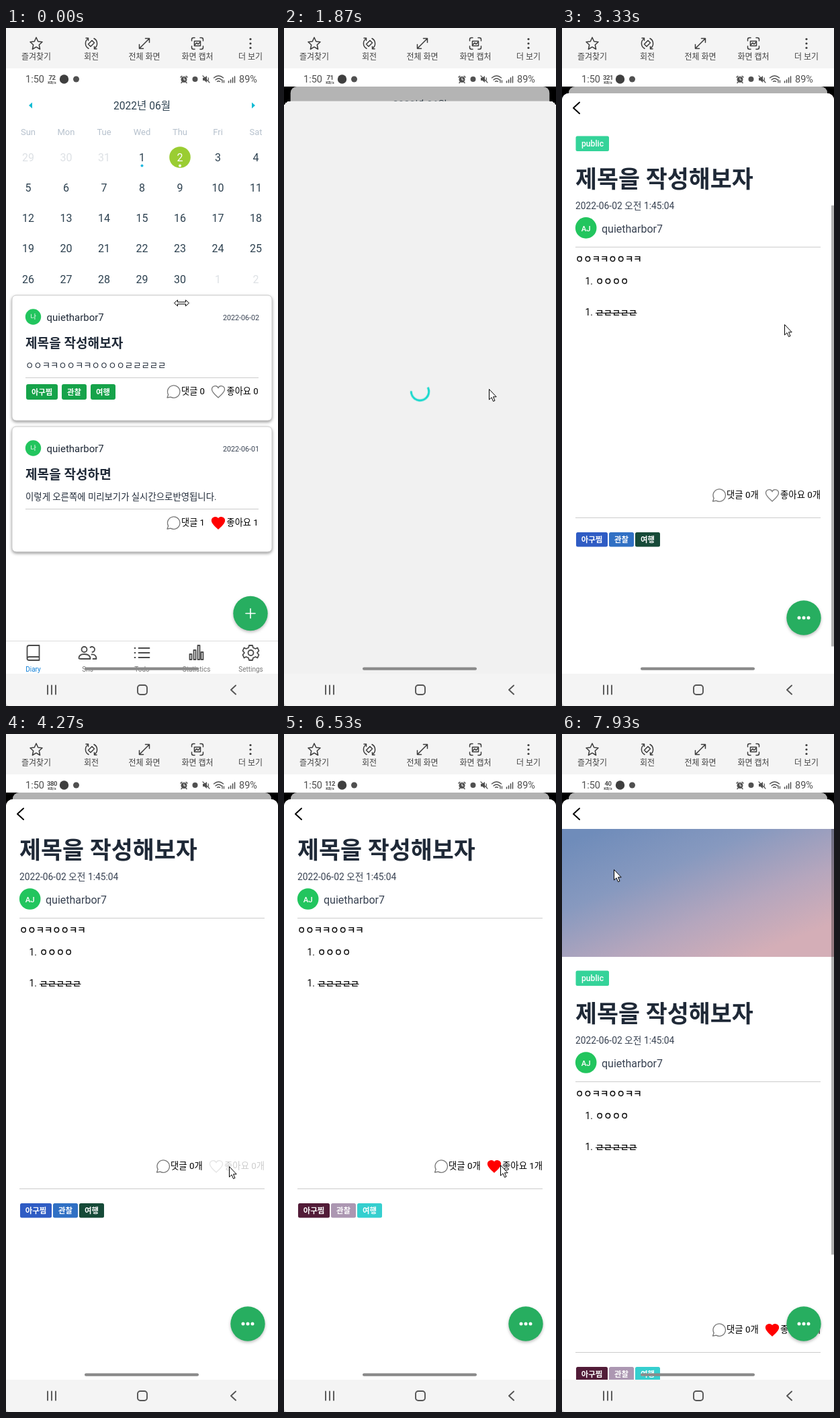
Recreate the animation shown at these times as an HTML page. Size 405 by 1007 pixels, loop 8 s.

```html
<!DOCTYPE html>
<html lang="ko">
<head>
<meta charset="utf-8">
<title>Diary</title>
<style>
@property --in { syntax: '<number>'; inherits: true; initial-value: 1; }
@property --scroll { syntax: '<number>'; inherits: true; initial-value: 0; }

html, body { margin: 0; width: 100%; height: 100%; overflow: hidden; background: #fff; }
#stage {
  position: relative; width: 405px; height: 1007px; overflow: hidden; background: #000;
  animation: enter 8s linear infinite, scroll 8s linear infinite;
}
svg { position: absolute; left: 0; top: 0; width: 405px; height: 1007px; }
text { font-family: Roboto, 'Noto Sans CJK KR', 'Noto Sans CJK', sans-serif; white-space: pre; }
.line { fill: none; stroke-linecap: round; stroke-linejoin: round; }
.medium { stroke: #000; stroke-width: .35px; }

#home, #sheet { position: absolute; left: 0; width: 405px; overflow: hidden; background: #fff; }
#home {
  top: 87px; height: 872px; transform-origin: 50% 0;
  transform: scale(calc(.951 + .049 * var(--in)));
  border-radius: calc((1 - var(--in)) * 10px);
}
#home svg { top: -87px; }
#dim { position: absolute; inset: 0; background: #000; opacity: calc(.3 * (1 - var(--in))); }
#sheet {
  top: 97px; height: 862px; border-radius: 10px 10px 0 0;
  transform: translateY(calc(var(--in) * 862px));
}
#sheet svg { top: -97px; }
#content { transform: translateY(calc(var(--scroll) * -1px)); }
#thumb { transform: translateY(calc(var(--scroll) * .76px)); }

.anim { animation: 8s linear infinite; }
.step { animation: 8s step-end infinite; }
#card { animation-name: card; }
#loading { animation-name: loading; }
#photo { animation-name: photo; }
#reactions { animation-name: reactions; }
#like { animation-name: like; }
#off { animation-name: unliked; }
#on { animation-name: liked; }
#author { animation-name: author; }
#bar { animation-name: bar; }
#speed { animation-name: speed; }
#glow { animation-name: glow; }
#arrow { animation-name: arrow; }
#resize { animation-name: resize; }
#point { animation-name: point; }
.tag { animation-name: tint; }
#spin { animation: spin 1.6s linear infinite, dash 1.6s linear infinite; }

@keyframes enter {
  0%, 15.5% { --in: 1; } 16.75% { --in: .507; } 18% { --in: .257; } 19.25% { --in: .13; }
  20.5% { --in: .066; } 21.75% { --in: .034; } 23.375% { --in: .0138; } 25.8%, to { --in: 0; }
}
@keyframes scroll {
  0%, 37.9% { --scroll: 0; animation-timing-function: cubic-bezier(.2, .6, .35, 1); }
  47% { --scroll: 271; }
  95.2% { --scroll: 271; animation-timing-function: cubic-bezier(.3, .5, .5, 1); }
  99.1%, to { --scroll: 28; }
}
@keyframes card { 0%, 10.4% { opacity: 1; } 10.9%, 11.7% { opacity: .2; } 14.1%, to { opacity: 1; } }
@keyframes loading { 0% { opacity: 1; } 25%, to { opacity: 0; } }
@keyframes photo { 0%, 27.5% { opacity: 0; } 31.25%, to { opacity: 1; } }
@keyframes reactions { 0% { opacity: 0; } 27.5%, to { opacity: 1; } }
@keyframes like {
  0%, 53.2% { opacity: 1; } 53.3%, 55% { opacity: .2; } 57.5%, 60.8% { opacity: 1; }
  61%, 62.6% { opacity: .2; } 65.4%, 70.8% { opacity: 1; }
  71%, 72.6% { opacity: .2; } 75.8%, to { opacity: 1; }
}
@keyframes liked { 0% { opacity: 0; } 57.5% { opacity: 1; } 65.6% { opacity: 0; } 76.25%, to { opacity: 1; } }
@keyframes unliked { 0% { opacity: 1; } 57.5% { opacity: 0; } 65.6% { opacity: 1; } 76.25%, to { opacity: 0; } }
@keyframes tint { 0% { fill: var(--a); } 57.5% { fill: var(--b); } 65.6% { fill: var(--c); } 76.25%, to { fill: var(--d); } }
@keyframes author { 0%, 92.5% { opacity: 1; } 93.4%, 95% { opacity: .2; } 97.8%, to { opacity: 1; } }
@keyframes bar { 0%, 38.3% { opacity: 0; } 38.6%, 48.4% { opacity: 1; } 51.6%, 95.2% { opacity: 0; } 95.5%, to { opacity: 1; } }
@keyframes speed {
  0% { transform: none; } 5% { transform: translateY(-20px); } 31.25% { transform: translateY(-40px); }
  42.5% { transform: translateY(-60px); } 56.25% { transform: translateY(-80px); }
  72.5% { transform: translateY(-100px); } 86.25% { transform: translateY(-120px); }
  97.5%, to { transform: translateY(-140px); }
}
@keyframes glow {
  0%, 36% { opacity: 0; transform: translate(335px, 722px); } 36.5% { opacity: 1; transform: translate(335px, 722px); }
  37.5% { opacity: 1; transform: translate(334px, 710px); } 40.4% { opacity: 1; transform: translate(332px, 480px); }
  41.3% { opacity: 0; transform: translate(331px, 440px); }
  92.4% { opacity: 0; transform: translate(113px, 250px); } 92.8% { opacity: 1; transform: translate(115px, 275px); }
  94.125% { opacity: 1; transform: translate(123px, 395px); } 95.6% { opacity: 1; transform: translate(120px, 510px); }
  96.3%, to { opacity: 0; transform: translate(119px, 520px); }
}
@keyframes arrow {
  0%, .875% { transform: translate(262px, 412px); animation-timing-function: ease-in-out; }
  9.1%, 26.6% { transform: translate(305px, 536px); animation-timing-function: ease-in-out; }
  33%, 36% { transform: translate(334px, 722px); } 37.5% { transform: translate(334px, 687px); }
  40% { transform: translate(332px, 470px); }
  41.3%, 47% { transform: translate(331px, 440px); animation-timing-function: ease-in-out; }
  51.6%, 59% { transform: translate(332px, 642px); } 61%, 70% { transform: translate(340px, 643px); }
  77%, 81.6% { transform: translate(322px, 640px); animation-timing-function: ease-in-out; }
  91.6% { transform: translate(112px, 236px); } 92.5% { transform: translate(115px, 265px); }
  94.125% { transform: translate(124px, 413px); } 95.6% { transform: translate(120px, 520px); }
  99.1%, to { transform: translate(77px, 201px); }
}
@keyframes resize { 0% { opacity: 1; } .875%, to { opacity: 0; } }
@keyframes point { 0% { opacity: 0; } .875%, to { opacity: 1; } }
@keyframes spin { to { transform: rotate(360deg); } }
@keyframes dash { 0%, to { stroke-dasharray: 170 190; } 50% { stroke-dasharray: 290 70; } }
</style>
</head>
<body>
<div id="stage">
  <div id="home"><svg id="homeArt"></svg><div id="dim"></div></div>
  <div id="sheet"><svg id="sheetArt"></svg></div>
  <svg id="chrome"></svg>
</div>
<script>
const INK = '#1f2937', GREEN = '#27ae60', USER = 'quietharbor7';
const BOLD = 'font-weight="700"', MEDIUM = 'class="medium"';

// y is the middle of the line; baselines sit on whole pixels
const text = (x, y, str, size, fill, attrs = '') =>
  `<text x="${x}" y="${Math.round(y + size * .355)}" font-size="${size}" fill="${fill}" ${attrs}>${str}</text>`;
const middle = (x, y, str, size, fill, attrs = '') => text(x, y, str, size, fill, 'text-anchor="middle" ' + attrs);
const line = (d, color, width = 1.5, attrs = '') =>
  `<path class="line" d="${d}" stroke="${color}" stroke-width="${width}" ${attrs}/>`;
const rect = (x, y, w, h, fill, r = 0, attrs = '') =>
  `<rect x="${x}" y="${y}" width="${w}" height="${h}" rx="${r}" fill="${fill}" ${attrs}/>`;
const dot = (x, y, r, fill, attrs = '') => `<circle cx="${x}" cy="${y}" r="${r}" fill="${fill}" ${attrs}/>`;
const at = (x, y, body) => `<g transform="translate(${x} ${y})">${body}</g>`;

const bubble = (x, y) => at(x, y, line('M-9.5 9L-7.8 4.6A9.2 9.2 0 1 1-4.3 8.1Z', '#777', 1.3));
const heart = (x, y, on) => at(x, y,
  `<path d="M0 9C-4 5.5-9.5 1-9.5-3.2A5 5 0 0 1 0-5.5A5 5 0 0 1 9.5-3.2C9.5 1 4 5.5 0 9Z"
    fill="${on ? '#f00' : 'none'}" stroke="${on ? '#f00' : '#777'}" stroke-width="1.3"/>`);
const fab = (x, y, icon) => at(x, y, dot(0, 0, 25.7, GREEN, 'filter="drop-shadow(0 2px 2px #0004)"') + icon);

function calendar() {
  const col = c => 33 + 56.5 * c;
  let out = middle(202.5, 115, '2022년 06월', 15.6, '#2d4150')
    + '<path d="M34 115L39 110.5V119.5Z M371 115L366 110.5V119.5Z" fill="#10bcd4"/>'
    + ['Sun', 'Mon', 'Tue', 'Wed', 'Thu', 'Fri', 'Sat'].map((d, i) => middle(col(i), 154.5, d, 13, '#b6c1cd')).join('')
    + dot(259, 192, 15.8, '#9acd32') + dot(259, 204.5, 2, '#fff') + dot(202.5, 204.5, 2, '#20b9e0');
  for (let i = 0; i < 35; i++) {
    const n = i - 2, outside = n < 1 || n > 30;
    const label = n < 1 ? n + 31 : n > 30 ? n - 30 : n;
    out += middle(col(i % 7), 192 + 45.25 * Math.floor(i / 7), label, 16,
      n === 2 ? '#fff' : outside ? '#dde1e5' : '#2d4150');
  }
  return out;
}

function card(y, { id = '', date, title, body, tags = [], count, on }) {
  const chips = tags.map(([x, w, s]) =>
    rect(x, y + 132, w, 23, '#16a34a', 3) + middle(x + w / 2, y + 143.5, s, 11.3, '#fff', BOLD)).join('');
  return rect(9, y, 387, 186, '#fff', 6, 'stroke="#ccc" filter="drop-shadow(0 2px 2px #0006)"')
    + `<g ${id && `id="${id}" class="anim"`}>`
    + dot(40.5, y + 32, 11.7, '#22c55e') + middle(40.5, y + 32, '나', 9.5, '#fff')
    + text(60.5, y + 33, USER, 15, INK) + text(377, y + 33, date, 10.7, '#374151', 'text-anchor="end"')
    + text(29, y + 71.5, title, 19.1, INK, BOLD) + text(29, y + 104, body, 13.4, INK)
    + rect(29, y + 122, 347, 1, '#ccc') + chips
    + bubble(249.5, y + 143) + text(261, y + 142, '댓글 ' + count, 13.2, '#000')
    + heart(316, y + 143, on) + text(328.5, y + 142, '좋아요 ' + count, 13.2, '#000') + '</g>';
}

function tabs() {
  const icons = [
    'M-9 9V-8Q-9-11-6-11H9V6H-6Q-9 6-9 8.5Q-9 11-6 11H9V6',
    'M-10 9Q-13 9-13 8Q-13 2-5 2Q4 2 4 9ZM-5-1A4 4 0 1 0-5-9A4 4 0 0 0-5-1M7-1A4 4 0 1 0 4-8M6 2.5Q13 2 13 9H8',
    'M-11-7H-10M-11 0H-10M-11 7H-10M-5-7H11M-5 0H11M-5 7H11',
    'M-10 10V2H-7V10ZM-4 10V-4H-1V10ZM2 10V-11H5V10ZM7 10V-1H10V10Z',
    'M-2.5-11H2.5L3.5-7.5L7-6L10-7.5L12-3L9.5 0L12 3L10 7.5L7 6L3.5 7.5L2.5 11H-2.5L-3.5 7.5L-7 6L-10 7.5L-12 3L-9.5 0L-12-3L-10-7.5L-7-6L-3.5-7.5ZM4 0A4 4 0 1 0-4 0A4 4 0 0 0 4 0'
  ];
  return rect(0, 910, 405, 49, '#fff') + rect(0, 910, 405, 1, '#ddd')
    + ['Diary', 'Sns', 'Todo', 'Statistics', 'Settings'].map((name, i) => {
      const x = 40.5 + 81 * i;
      return at(x, 928, line(icons[i], '#4a4a4a', 1.8)) + middle(x, 952.5, name, 10, i ? '#777' : '#1080d8');
    }).join('');
}

homeArt.innerHTML = calendar()
  + card(397, {
    id: 'card', date: '2022-06-02', title: '제목을 작성해보자', body: 'ㅇㅇㅋㅋㅇㅇㅋㅋㅇㅇㅇㅇㄹㄹㄹㄹㄹ',
    tags: [[30, 47, '아구찜'], [83, 37, '관찰'], [126, 37, '여행']], count: 0
  })
  + card(592, {
    date: '2022-06-01', title: '제목을 작성하면',
    body: '이렇게 오른쪽에 미리보기가 실시간으로반영됩니다.', count: 1, on: true
  })
  + fab(364, 869.5, line('M-7 0H7M0-7V7', '#fff', 1.6)) + tabs();

const tag = (x, w, label, [a, b, c, d]) =>
  rect(x, 968, w, 21.5, a, 2.5, `class="tag step" style="--a:${a};--b:${b};--c:${c};--d:${d}"`)
  + middle(x + w / 2, 979, label, 11.4, '#fff', BOLD);
const likes = (id, on) => `<g id="${id}" class="step">${heart(313, 913, on)}${text(325, 912, `좋아요 ${on ? 1 : 0}개`, 13.4, '#000')}</g>`;

sheetArt.innerHTML = `
<defs><linearGradient id="sky" gradientUnits="userSpaceOnUse" x1="150" y1="130" x2="250" y2="372">
  <stop offset="0" stop-color="#6f8cba"/><stop offset=".35" stop-color="#8799bf"/>
  <stop offset=".7" stop-color="#b5a6bd"/><stop offset="1" stop-color="#d4aeb7"/>
</linearGradient></defs>
<g id="content">`
  + rect(0, 141, 405, 218, 'url(#sky)', 0, 'id="photo" class="anim"')
  + rect(20.5, 379.5, 49.5, 22.5, '#34d399', 2.5) + middle(45.5, 391, 'public', 12.2, '#fff', 'font-weight="500"')
  + text(20, 443.5, '제목을 작성해보자', 34.8, INK, BOLD)
  + text(20, 483, '2022-06-02 오전 1:45:04', 13.8, '#374151')
  + '<g id="author" class="anim">' + dot(35.7, 516, 15.8, '#22c55e')
  + middle(35.7, 516.5, 'AJ', 11.5, '#fff', 'font-weight="500"') + text(59, 517, USER, 16, '#374151') + '</g>'
  + rect(20, 544, 365, 1, '#ccc')
  + text(20, 562, 'ㅇㅇㅋㅋㅇㅇㅋㅋ', 13.4, '#000', MEDIUM)
  + text(34.5, 595, '1.', 13.8, '#000') + text(50, 595, 'ㅇㅇㅇㅇ', 13.4, '#000', MEDIUM)
  + text(34.5, 641.5, '1.', 13.8, '#000') + text(50, 642, 'ㄹㄹㄹㄹㄹ', 13.4, '#000', MEDIUM)
  + rect(50, 642, 61.5, 1, '#000')
  + '<g id="reactions" class="step">' + bubble(234, 913) + text(245, 912, '댓글 0개', 13.4, '#000')
  + '<g id="like" class="anim">' + likes('off', false) + likes('on', true) + '</g></g>'
  + rect(20, 946, 365, 1, '#ccc')
  + tag(21, 47, '아구찜', ['#2f5cc4', '#8d6b3a', '#f7a9b8', '#521c38'])
  + tag(70, 37, '관찰', ['#3070c4', '#3fa37c', '#4ce34f', '#ac97b2'])
  + tag(109, 37, '여행', ['#164a38', '#b8527d', '#d9c11c', '#35cfcf'])
  + '</g>'
  + `<g id="bar" class="anim">${rect(401, 97, 4, 655, '#0000004d', 0, 'id="thumb"')}</g>`
  + rect(0, 97, 405, 44, '#fff') + line('M26 110.5L17 118.8L26 127', '#000', 2)
  + fab(360, 876, dot(-7, 0, 2.5, '#fff') + dot(0, 0, 2.5, '#fff') + dot(7, 0, 2.5, '#fff'))
  + '<g id="loading" class="step">' + rect(0, 97, 405, 862, '#f1f1f1')
  + at(202.5, 528, `<g transform="rotate(-89)"><circle id="spin" r="13.2" fill="none" stroke="#14d8cc" stroke-width="3" pathLength="360"/></g>`)
  + '</g>';

function toolbar() {
  const c = '#3c3c3c';
  const items = [
    [45, '즐겨찾기', 'M0-9L2.7-3L9-2.3L4.3 2L5.6 8.5L0 5.2L-5.6 8.5L-4.3 2L-9-2.3L-2.7-3Z'],
    [127, '회전', 'M1-4.5L4.5-1L-1 4.5L-4.5 1ZM-4 7.5A8.5 8.5 0 0 1-5-7M-8-8H-4.5V-4.5M4-7.5A8.5 8.5 0 0 1 5 7M8 8H4.5V4.5'],
    [206, '전체 화면', 'M-7.5 7.5L7.5-7.5M1.5-7.5H7.5V-1.5M-1.5 7.5H-7.5V1.5'],
    [285, '화면 캡처', 'M-8.5-4V-6Q-8.5-8.5-6-8.5H-4M4-8.5H6Q8.5-8.5 8.5-6V-4M8.5 4V6Q8.5 8.5 6 8.5H4M-4 8.5H-6Q-8.5 8.5-8.5 6V4M-4.5-3.5H4.5V3.5H-4.5ZM-4 2L-1-1L1 1L4-2'],
    [364, '더 보기', '']
  ];
  return rect(0, 0, 405, 60, '#f4f4f4') + items.map(([x, label, d]) =>
    at(x, 23, d ? line(d, c, 1.5) : [-6.5, 0, 6.5].map(y => dot(0, y, 1.6, c)).join(''))
    + middle(x, 42.5, label, 12, '#444')).join('');
}

function statusBar() {
  const c = '#505050';
  const speeds = [72, 71, 321, 380, 374, 112, 75, 40]
    .map((n, i) => middle(68.5, 73.5 + 20 * i, n, 9.5, c, BOLD + ' letter-spacing="-.5"')).join('');
  return rect(0, 60, 405, 27, '#fff') + text(29, 76, '1:50', 14.5, c)
    + `<clipPath id="slot"><rect x="58" y="66" width="20" height="12"/></clipPath>
       <g clip-path="url(#slot)"><g id="speed" class="step">${speeds}</g></g>`
    + middle(68.5, 81, 'KB/s', 5.8, c, BOLD)
    + dot(86.5, 76, 6.7, '#3f3f3f') + dot(104.5, 76, 4.5, c)
    + at(265, 76.5, dot(0, 0, 4.5, c) + line('M0-2.5V.5H2', '#fff', 1) + line('M-5-3.5L-3.2-5M5-3.5L3.2-5M-3 4L-4 5M3 4L4 5', c, 1.6))
    + dot(281.5, 76, 4, c)
    + at(298, 76, `<path d="M-5-2H-2.5L1-5V5L-2.5 2H-5Z" fill="${c}"/>` + line('M3-2Q4 0 3 2M-5-5L5 5', c, 1.2))
    + at(316.5, 76, line('M-7-2Q0-8 7-2M-4.5 1Q0-3 4.5 1M-2 3.5Q0 2 2 3.5M5.5 1V5M8 2V5', c, 1.3))
    + at(336, 81, line('M-4.5 0V-2M-1.5 0V-4M1.5 0V-7M4.5 0V-9', c, 1.5))
    + text(347, 76, '89%', 14.5, c);
}

function navigation() {
  return '<path d="M0 1000V1007H405V1000Z" fill="#d4d4d4"/>'
    + '<path d="M0 959H405V1001Q405 1007 399 1007H6Q0 1007 0 1001Z" fill="#f4f4f4"/>'
    + line('M62 976.5V989.5M68 976.5V989.5M74 976.5V989.5M342 976.5L335 983L342 989.5', '#555', 1.9)
    + rect(196, 976, 14, 14, 'none', 4, 'stroke="#555" stroke-width="1.9"')
    + rect(117, 949.5, 170, 4.3, '#8a8a8a', 2.1);
}

chrome.innerHTML = `
<defs><radialGradient id="halo">
  <stop offset="0" stop-color="#3fcaf8" stop-opacity=".8"/><stop offset=".3" stop-color="#45ccf8" stop-opacity=".68"/>
  <stop offset=".6" stop-color="#4fcff8" stop-opacity=".36"/><stop offset=".85" stop-color="#5fd4f9" stop-opacity=".09"/>
  <stop offset="1" stop-color="#6fd8fa" stop-opacity="0"/>
</radialGradient></defs>`
  + toolbar() + statusBar() + navigation()
  + `<g id="glow" class="anim">${dot(0, 0, 32, 'url(#halo)')}</g>`
  + `<g id="resize" class="step">${at(261.5, 408.5,
    '<path d="M-11 0L-6-4.5V-1.5H6V-4.5L11 0L6 4.5V1.5H-6V4.5Z" fill="#fff" stroke="#000"/>')}</g>`
  + `<g id="point" class="step"><g id="arrow" class="anim">
      <path d="M.5.5V16L4 12.7L6.6 18.5L9 17.4L6.5 11.8H11.2Z" fill="#fff" stroke="#000"/></g></g>`;
</script>
</body>
</html>
```
